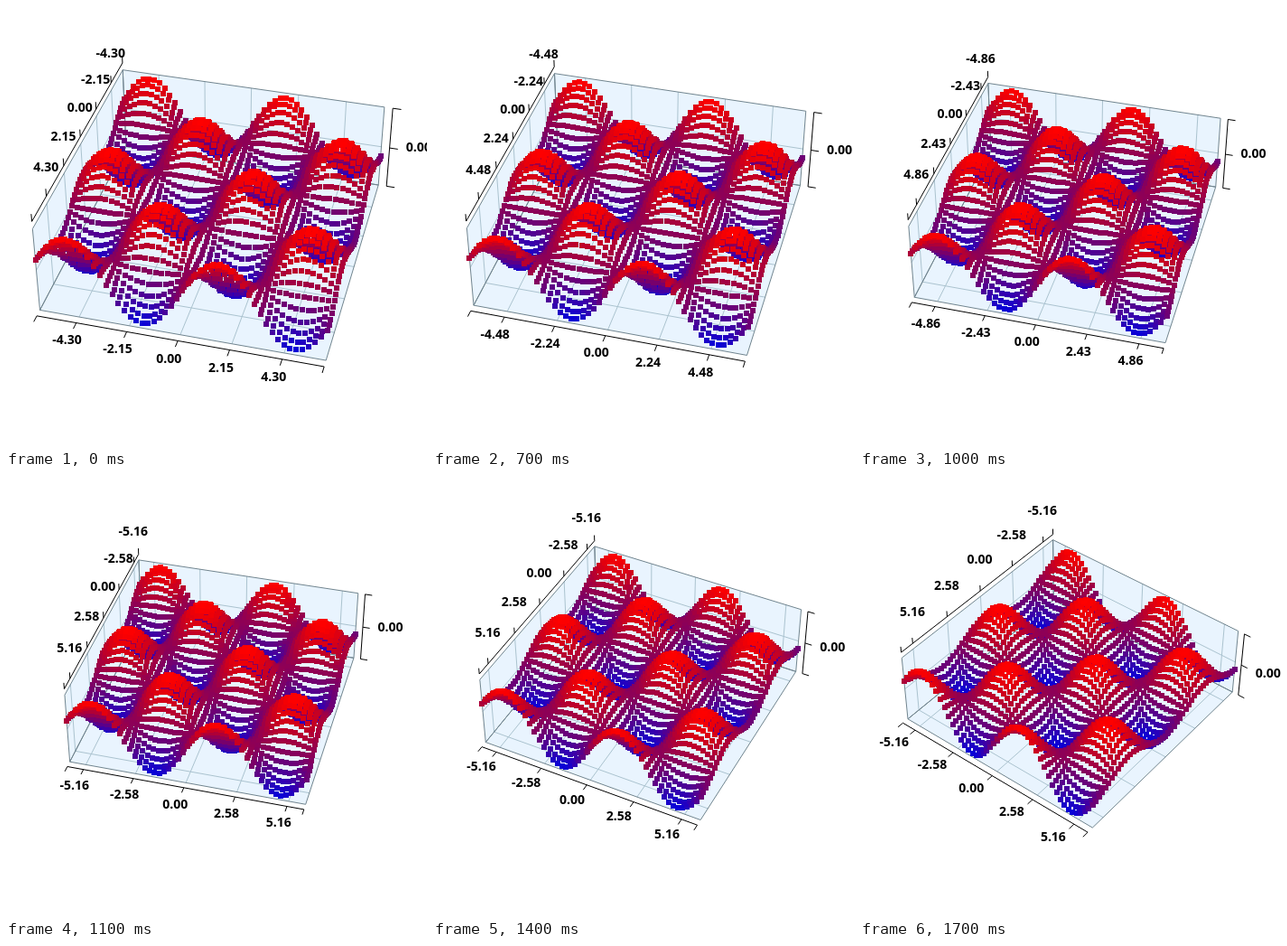
These frames come from a looping animation (466x489 px, 2100 ms). An HTML page with a canvas:

```html
<!DOCTYPE html>
<html lang="en">
<head>
<meta charset="utf-8">
<title>Rotating wave plot</title>
<style>
  html, body { margin: 0; width: 100%; height: 100%; overflow: hidden; background: #fff; }
  canvas { display: block; width: 466px; height: 489px; }
</style>
</head>
<body>
<canvas id="plot" width="466" height="489"></canvas>
<script>
const ctx = document.getElementById("plot").getContext("2d");
const LOOP = 2100;
const RANGE = 6;      // data limit on x and y; the box spans -1..1
const HIGH = 0.355;   // half height of the box
const AMP = 0.322;    // wave height
const STEPS = 49;
const DOT = 6;
const FOCUS = 1750;
const GAP = 0.062;    // distance of an axis from its box edge

// start time, zoom, yaw and tilt in degrees
const POSES = [
  [0, 1.2, 14.55, 37.5],
  [600, 1.2, 15, 37.9],
  [700, 1.152, 15, 38.1],
  [800, 1.1059, 15, 38.1],
  [1000, 1.0617, 15, 38.1],
  [1100, 1, 15, 38.1],
  [1300, 1, 16.65, 39.4],
  [1400, 1, 26.5, 41.8],
  [1500, 1, 34.85, 43.1],
  [1600, 1, 36.8, 43.1],
  [1700, 1, 38.2, 43.1]
];

const wave = [];
for (let i = 0; i <= STEPS; i++) {
  for (let j = 0; j <= STEPS; j++) {
    const x = 2 * i / STEPS - 1, y = 2 * j / STEPS - 1;
    const z = Math.sin(x * RANGE) * Math.cos(y * RANGE);
    const f = (z + 1) / 2;
    const red = Math.round(255 * f ** 0.85), blue = Math.round(220 * (1 - f) ** 1.35);
    wave.push({ at: [x, y, z * AMP], color: `rgb(${red},0,${blue})` });
  }
}

function camera(zoom, yaw, tilt) {
  const rad = Math.PI / 180, k = 130.2 * zoom;
  const c = Math.cos(yaw * rad), s = Math.sin(yaw * rad);
  const ce = Math.cos(tilt * rad), se = Math.sin(tilt * rad);
  return ([x, y, z]) => {
    const u = x * c - y * s, v = x * s + y * c;
    const near = k * (v * ce + z * se);
    const p = k * FOCUS / (FOCUS - near);
    return [234.2 + u * p, 220.6 + (v * se - z * ce) * p, near];
  };
}

function draw([, zoom, yaw, tilt]) {
  const project = camera(zoom, yaw, tilt);
  const tick = 5.16 / zoom;
  const marks = [-1, -0.5, 0, 0.5, 1].map(m => m * tick);

  const trace = points => {
    ctx.beginPath();
    points.forEach(p => {
      const [x, y] = project(p);
      ctx.lineTo(x, y);
    });
  };
  const line = (color, ...points) => {
    ctx.strokeStyle = color;
    trace(points);
    ctx.stroke();
  };
  const label = (value, x, y, align) => {
    ctx.textAlign = align;
    ctx.fillText(value.toFixed(2), x, y);
  };

  ctx.fillStyle = "#fff";
  ctx.fillRect(0, 0, 466, 489);
  ctx.lineWidth = 1;

  // floor, back wall, left wall
  const faces = [
    [[-1, 1, -HIGH], [1, 1, -HIGH], [1, -1, -HIGH], [-1, -1, -HIGH]],
    [[-1, -1, HIGH], [1, -1, HIGH], [1, -1, -HIGH], [-1, -1, -HIGH]],
    [[-1, -1, HIGH], [-1, 1, HIGH], [-1, 1, -HIGH], [-1, -1, -HIGH]]
  ];
  ctx.fillStyle = "#e9f4fe";
  faces.forEach(face => { trace(face); ctx.fill(); });

  const grid = "#abc3cf", edge = "#71858f";
  marks.forEach(m => {
    const q = m / RANGE;
    line(grid, [q, 1, -HIGH], [q, -1, -HIGH], [q, -1, HIGH]);
    line(grid, [1, q, -HIGH], [-1, q, -HIGH], [-1, q, HIGH]);
  });
  line(grid, [-1, 1, 0], [-1, -1, 0], [1, -1, 0]);
  faces.forEach(face => line(edge, ...face, face[0]));

  // axes with end ticks
  const out = 1 + GAP, tip = 1 + 2 * GAP;
  const top = HIGH + GAP, topTip = HIGH + 2 * GAP;
  const ink = "#000";
  line(ink, [-1, out, -HIGH], [1, out, -HIGH]);
  line(ink, [-1, -1, top], [-1, 1, top]);
  line(ink, [out, -1, -HIGH], [out, -1, HIGH]);
  [-1, 1, ...marks.map(m => m / RANGE)].forEach(q => {
    line(ink, [q, out, -HIGH], [q, tip, -HIGH]);
    line(ink, [-1, q, top], [-1, q, topTip]);
  });
  [-HIGH, 0, HIGH].forEach(z => line(ink, [out, -1, z], [tip, -1, z]));

  // nearer dots cover farther ones
  wave.map(dot => ({ spot: project(dot.at), color: dot.color }))
    .sort((a, b) => a.spot[2] - b.spot[2])
    .forEach(({ spot, color }) => {
      ctx.fillStyle = color;
      ctx.fillRect(Math.round(spot[0] - DOT / 2), Math.round(spot[1] - DOT / 2), DOT, DOT);
    });

  ctx.fillStyle = ink;
  ctx.font = "bold 14px 'Open Sans', 'Noto Sans', sans-serif";
  ctx.textBaseline = "alphabetic";
  const turn = yaw - 14.5, drop = 5;
  marks.forEach(m => {
    const a = project([m / RANGE, tip, -HIGH]);
    label(m, a[0] - 7 - 0.45 * turn, a[1] + 12.4 - 0.17 * turn + drop, "center");
    const b = project([-1, m / RANGE, HIGH]);
    label(m, b[0] - 1, b[1] - 41 + drop, "center");
  });
  const end = project([tip, -1, 0]);
  label(0, end[0] + 9, end[1] - 2 + 0.3 * turn + drop, "left");
}

let shown = null;
const start = performance.now();
function frame(now) {
  const t = Math.max(0, now - start) % LOOP;
  const pose = POSES.filter(p => p[0] <= t).pop();
  if (pose !== shown) draw(shown = pose);
  requestAnimationFrame(frame);
}
frame(start);
</script>
</body>
</html>
```
